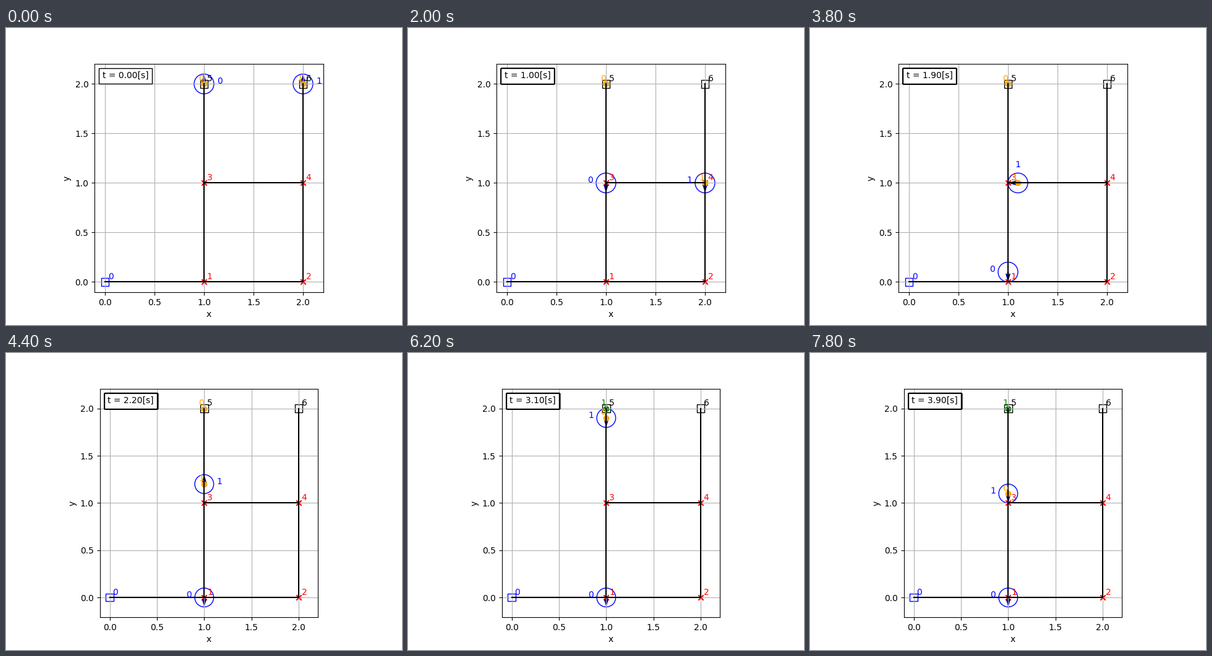
A matplotlib script that plays this animation: 640x480 px, repeating every 8000 ms.

```python
import numpy as np
import matplotlib.pyplot as plt
from matplotlib.animation import FuncAnimation
from matplotlib.offsetbox import AnchoredText
from matplotlib.patches import Circle

STEPS = 40          # animation steps, 0.1 s of simulated time each
LEG = 10            # steps needed to travel one edge
HANDOVER = 30       # step at which item 1 is delivered and item 0 picked up
RADIUS = 0.1

NODES = np.array([(0, 0), (1, 0), (2, 0), (1, 1), (2, 1), (1, 2), (2, 2)])
EDGES = [(0, 1), (1, 2), (1, 3), (3, 4), (2, 4), (3, 5), (4, 6)]
ROUTES = [(5, 3, 1), (6, 4, 3, 5, 3, 1)]

fig, ax = plt.subplots(figsize=(6.4, 4.8), dpi=100)
ax.set_aspect("equal")
ax.set_xlabel("x")
ax.set_ylabel("y")
ax.grid(True)


def draw_map():
    for a, b in EDGES:
        ax.plot(*NODES[[a, b]].T, color="black", lw=1.5)
    for n, (x, y) in enumerate(NODES):
        if 1 <= n <= 4:
            color = "red"
            ax.scatter(x, y, marker="x", color=color)
        else:
            color = "blue" if n == 0 else "black"
            ax.scatter(x, y, s=80, marker="s", facecolors="none",
                       edgecolors=color, linewidths=1)
        ax.text(x + 0.03, y + 0.03, str(n), color=color)


def make_clock(step):
    box = AnchoredText(f"t = {step / 10:.2f}[s]", loc="upper left")
    ax.add_artist(box)
    return box


def pose(route, step):
    """Position and unit heading of an agent following its route."""
    if step == 0:
        return NODES[route[0]], np.array([0, 1])
    step = min(step, LEG * (len(route) - 1))
    leg = (step - 1) // LEG
    a, b = NODES[route[leg]], NODES[route[leg + 1]]
    return a + (b - a) * (step - leg * LEG) / LEG, b - a


def draw_agent(n, pos, head):
    x, y = pos
    side = pos + 0.16 * np.array([head[1], -head[0]])
    return [
        ax.add_patch(Circle(pos, RADIUS, fill=False, ec="blue")),
        ax.quiver(x, y, *(RADIUS * head), color="darkblue", angles="xy",
                  scale_units="xy", scale=1),
        ax.text(*side, str(n), color="blue", ha="center"),
    ]


def draw_item(n, pos, color):
    x, y = pos
    return [
        ax.scatter(x, y, color=color),
        ax.text(x - 0.03, y + 0.03, str(n), color=color, ha="center"),
    ]


def set_view(low):
    """Fit the data with a 5 % margin on each side."""
    high = 2 + RADIUS
    ax.set_xlim(-0.05 * high, 1.05 * high)
    pad = 0.05 * (high - low)
    ax.set_ylim(low - pad, high + pad)


draw_map()
clocks = [make_clock(k) for k in range(STEPS)]
live = []


def update(step):
    while live:
        live.pop().remove()
    poses = [pose(route, step) for route in ROUTES]
    for n, (pos, head) in enumerate(poses):
        live.extend(draw_agent(n, pos, head))

    carrier, shelf = poses[1][0], NODES[5]
    if step < HANDOVER:
        live.extend(draw_item(0, shelf, "orange"))
        live.extend(draw_item(1, carrier, "orange"))
    else:
        live.extend(draw_item(0, carrier, "orange"))
        live.extend(draw_item(1, shelf, "green"))

    # clock boxes pile up, so their outline grows heavier
    for k, box in enumerate(clocks):
        box.set_visible(k <= step)
    set_view(-RADIUS if step >= 2 * LEG else 0)
    return live


anim = FuncAnimation(fig, update, frames=STEPS, interval=200,
                     init_func=lambda: [], repeat=True, repeat_delay=0)
plt.show()
```
